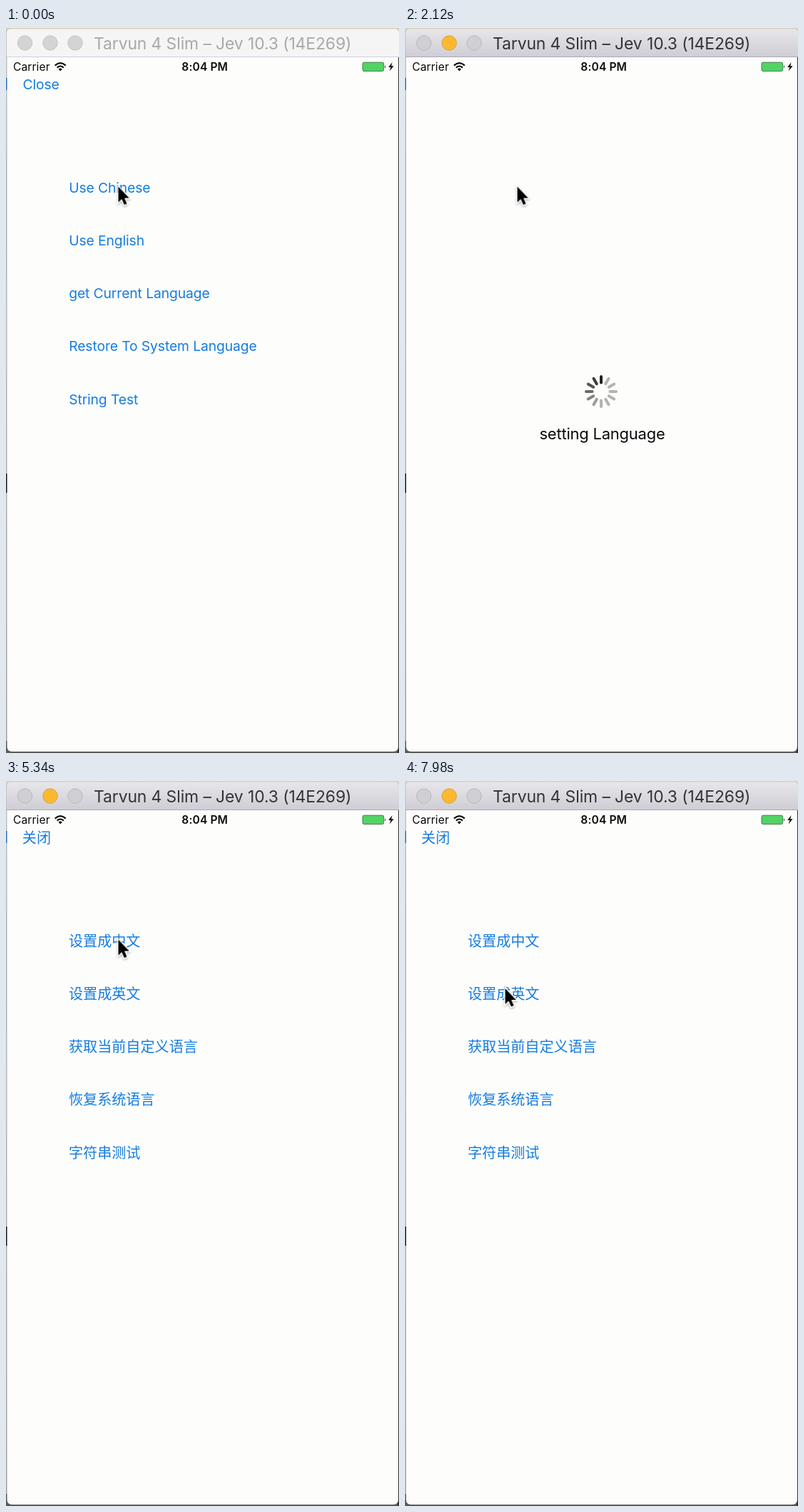
An HTML page that plays this animation: 551x1017 px, repeating every 8000 ms.

```html
<!DOCTYPE html>
<html lang="en">
<head>
<meta charset="utf-8">
<title>Language settings</title>
<style>
  html, body { margin: 0; width: 100%; height: 100%; overflow: hidden; background: #fdfdfc; }
  svg { display: block; width: 100vw; height: 100vh; }
  text { font-family: Inter, Roboto, sans-serif; white-space: pre; }

  .title { font-size: 22.9px; letter-spacing: -.1px; }
  .status { font-size: 15.6px; letter-spacing: .1px; fill: #0a0a0a; }
  .clock { font-weight: 600; text-anchor: middle; }
  .menu text { font-size: 19.3px; letter-spacing: -.1px; fill: #157cde; }
  .menu.zh text { font-family: "Noto Sans CJK SC", "Noto Sans CJK", sans-serif; font-size: 20.1px; letter-spacing: 0; }
  .label { font-size: 21.9px; letter-spacing: -.18px; text-anchor: middle; fill: #0a0a0a; }

  .inactive, .active, .en, .loading, .zh { animation: 8s step-end infinite; }
  .inactive { animation-name: hide-inactive; }
  .active { animation-name: show-active; }
  .en { animation-name: hide-en; }
  .loading { animation-name: show-loading; }
  .zh { animation-name: show-zh; }
  @keyframes hide-inactive { 0% { opacity: 1 } 14.5%, 100% { opacity: 0 } }
  @keyframes show-active { 0% { opacity: 0 } 14.5%, 100% { opacity: 1 } }
  @keyframes hide-en { 0% { opacity: 1 } 16.25%, 100% { opacity: 0 } }
  @keyframes show-loading { 0% { opacity: 0 } 16.25% { opacity: 1 } 66.25%, 100% { opacity: 0 } }
  @keyframes show-zh { 0% { opacity: 0 } 66.25%, 100% { opacity: 1 } }

  /* 116 twelfths of a turn per loop */
  .spinner { animation: spin 8s steps(116) infinite; }
  @keyframes spin { from { transform: rotate(180deg) } to { transform: rotate(3660deg) } }

  .cursor { animation: point 8s ease-in-out infinite; }
  @keyframes point {
    0%, 71% { transform: translate(157.5px, 222.5px) }
    76%, 81% { transform: translate(150.5px, 231px) }
    89%, 93.5% { transform: translate(140.5px, 324px) }
    98.5%, 100% { transform: translate(140.5px, 291px) }
  }
</style>
</head>
<body>
<svg viewBox="0 0 551 1017" preserveAspectRatio="none">
  <defs>
    <linearGradient id="edge" x2="0" y2="1">
      <stop offset="0" stop-color="#c4c4c0"/>
      <stop offset=".2" stop-color="#a9b2c0"/>
      <stop offset=".45" stop-color="#b4b4b4"/>
      <stop offset="1" stop-color="#a0a0a0"/>
    </linearGradient>
    <linearGradient id="bar" x2="0" y2="1">
      <stop offset="0" stop-color="#e7e6ea"/>
      <stop offset="1" stop-color="#cecdd4"/>
    </linearGradient>
    <filter id="shadow" x="-50%" y="-50%" width="200%" height="200%">
      <feDropShadow dx="0" dy="1.5" stdDeviation="1.5" flood-opacity=".35"/>
    </filter>
  </defs>

  <!-- what shows around the window -->
  <rect width="551" height="1017" fill="url(#edge)"/>
  <rect y="70" width="3" height="17" fill="#2a6fc4"/>
  <rect y="625" width="3" height="27" fill="#16161c"/>
  <rect y="1000" width="551" height="17" fill="#5a5a5a"/>
  <rect x="549" y="40" width="2" height="977" fill="#333"/>
  <path d="M1.5 30H550V1008Q550 1015 543 1015H8.5Q1.5 1015 1.5 1008Z" fill="#fdfdfc"/>

  <rect width="551" height="3" fill="#d6d3bd"/>
  <g class="inactive">
    <path d="M1 41V7Q1 1.5 7 1.5H545Q551 1.5 551 7V41Z" fill="#f5f5f5"/>
    <path d="M1 40.5H551" stroke="#cfcfe0"/>
    <g fill="#d4d4d4" stroke="#c4c4c6">
      <circle cx="26.5" cy="21" r="10.2"/><circle cx="62" cy="21" r="10.2"/><circle cx="97" cy="21" r="10.2"/>
    </g>
    <text class="title" x="123" y="29.7" fill="#a9a9ab">Tarvun 4 Slim – Jev 10.3 (14E269)</text>
  </g>
  <g class="active">
    <path d="M1 41V7Q1 1.5 7 1.5H545Q551 1.5 551 7V41Z" fill="url(#bar)"/>
    <path d="M1 40.5H551" stroke="#aaa8b6"/>
    <g fill="#d0cfd3" stroke="#b9b8be">
      <circle cx="26.5" cy="21" r="10.2"/><circle cx="97" cy="21" r="10.2"/>
      <circle cx="62" cy="21" r="10.2" fill="#fdb832" stroke="#dfa02c"/>
    </g>
    <text class="title" x="123" y="29.7" fill="#343436">Tarvun 4 Slim – Jev 10.3 (14E269)</text>
  </g>

  <!-- status bar -->
  <text class="status" x="9.9" y="60">Carrier</text>
  <g fill="none" stroke="#0a0a0a" stroke-width="2.1">
    <path d="M68.7 52.6Q76.2 45.8 83.7 52.6"/>
    <path d="M71.6 55.6Q76.2 51.4 80.8 55.6"/>
  </g>
  <path d="M73.6 57.7Q76.2 55.5 78.8 57.7L76.2 60.4Z" fill="#0a0a0a"/>
  <text class="status clock" x="278.7" y="60">8:04 PM</text>
  <rect x="500" y="48.2" width="29.6" height="12.4" rx="2" fill="#53d266" stroke="#3f7f4a"/>
  <path d="M531 52.2Q533 54.4 531 56.6Z" fill="#222"/>
  <path d="M541.6 48L536.2 55H539.4L537.8 60.6L543.6 53.2H540.2Z" fill="#0a0a0a"/>

  <g class="menu en">
    <text x="23.5" y="86.3">Close</text>
    <text x="88.2" y="230.8">Use Chinese</text>
    <text x="88.2" y="305">Use English</text>
    <text x="88.2" y="379.2">get Current Language</text>
    <text x="88.2" y="453.4">Restore To System Language</text>
    <text x="88.2" y="527.6">String Test</text>
  </g>

  <g class="menu zh" lang="zh-CN">
    <text x="22.8" y="87.2">关闭</text>
    <text x="88" y="231.8">设置成中文</text>
    <text x="88" y="306">设置成英文</text>
    <text x="88" y="380.2">获取当前自定义语言</text>
    <text x="88" y="454.4">恢复系统语言</text>
    <text x="88" y="528.6">字符串测试</text>
  </g>

  <g class="loading">
    <g transform="translate(275 510)">
      <g class="spinner" id="spinner" stroke="#0a0a0a" stroke-width="4" stroke-linecap="round"></g>
    </g>
    <text class="label" x="276.5" y="577">setting Language</text>
  </g>

  <g class="cursor">
    <path d="M0 0V22L4.8 17.5L8.4 25.6L12 24L8.6 16H15.2Z" fill="#000" stroke="#fff"
          stroke-width="2.6" paint-order="stroke" filter="url(#shadow)"/>
  </g>
</svg>
<script>
  const spinner = document.getElementById('spinner');
  // Spokes fade counter-clockwise behind the leading one.
  for (let i = 0; i < 12; i++) {
    const spoke = document.createElementNS(spinner.namespaceURI, 'path');
    spoke.setAttribute('d', 'M0 -12.5V-21');
    spoke.setAttribute('transform', `rotate(${-30 * i})`);
    spoke.setAttribute('opacity', Math.max(.3, .9 - .1 * i));
    spinner.append(spoke);
  }
</script>
</body>
</html>
```
